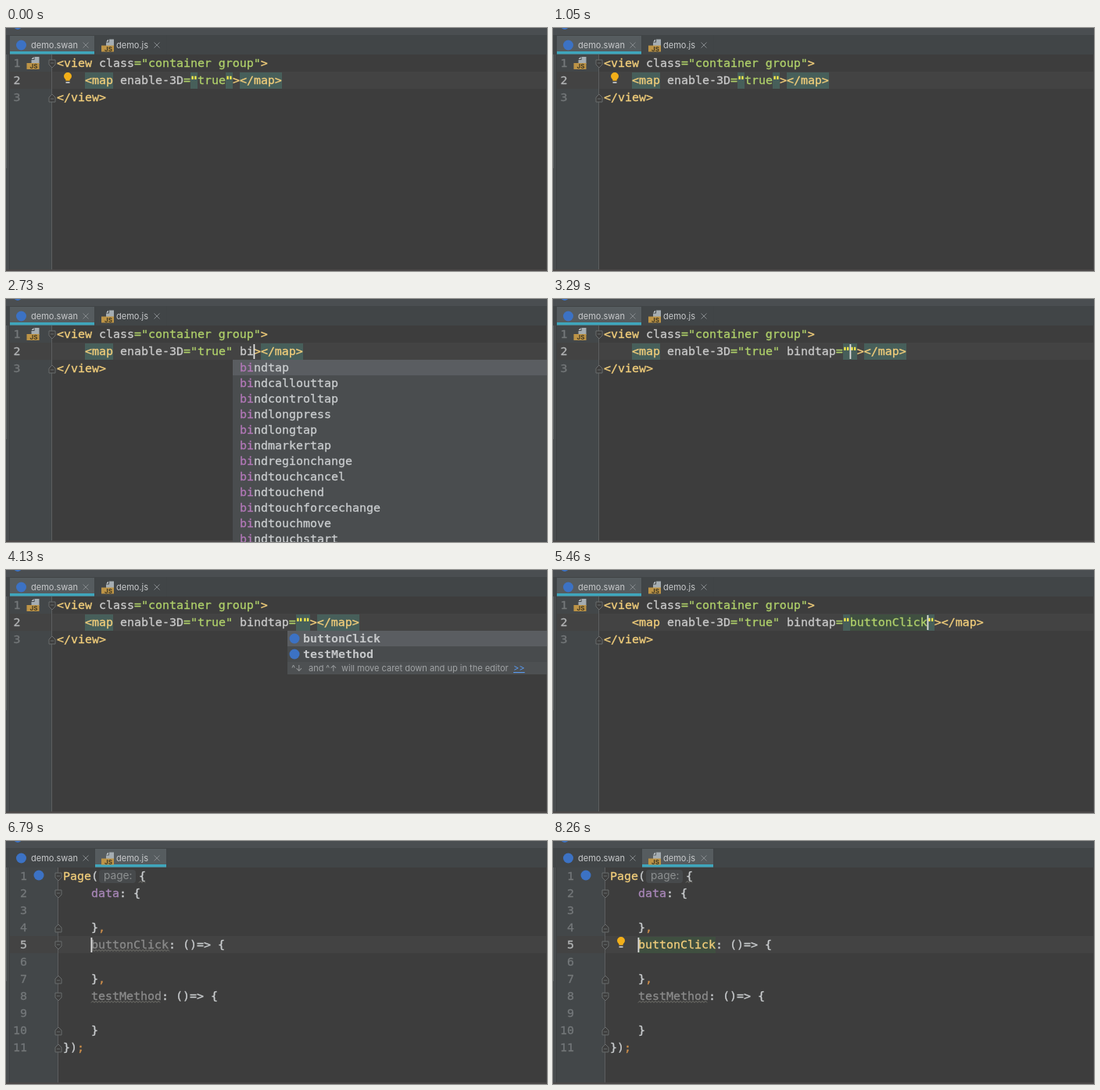
Recreate the animation shown at these times as an HTML page. Size 692 by 312 pixels, loop 8330 ms.

```html
<!DOCTYPE html>
<html lang="en">
<head>
<meta charset="utf-8">
<title>Editor completion</title>
<style>
  html, body { margin: 0; width: 100%; height: 100%; overflow: hidden; background: #3d3d3d; }
  svg { display: block; width: 692px; height: 312px; }
  text { white-space: pre; }
  .code, .ui, tspan { fill: currentColor; }
  .code, .code tspan { stroke: currentColor; stroke-width: .3px; }
  .code { font: 14.95px "DejaVu Sans Mono", monospace; color: #cbced0; }
  .ui { font: 11px Inter, sans-serif; color: #c8cacc; }
  .tag, .fn { color: #f2ce7b; }
  .attr { color: #cacaca; }
  .str { color: #b0d16a; }
  .quote { color: #fff04a; font-weight: 700; }
  .key { color: #a987b9; }
  .dim { color: #8b8b8b; }
  .punct { color: #cf8f4a; }
  .num { color: #74787a; }
  .now { color: #b4b6b7; }
  .typed { color: #b278b8; }
  .bold { font-weight: 700; color: #c6c8ca; stroke: none; }
  .hint { color: #a0a3a5; }
  .link { color: #5b9bf0; text-decoration: underline; }
  .match { fill: #475f5a; }
  .usage { fill: #3f4f40; }
  .line { fill: none; stroke: #696c6d; }
</style>
</head>
<body>
<svg viewBox="0 0 692 312" id="stage"></svg>
<script>
const LOOP = 8330, CHAR = 9, ROW = 22;
const EVENTS = ["tap", "callouttap", "controltap", "longpress", "longtap", "markertap",
  "regionchange", "touchcancel", "touchend", "touchforcechange", "touchmove", "touchstart"];

// at: start of the state, blink: start of a caret cycle
const STATES = [
  { at: 0, blink: -580, add: "", quotes: 19, bulb: true },
  { at: 1610, add: " ", quotes: 19 },
  { at: 1890, add: " b" },
  { at: 1960, blink: 1890, add: " b", list: 1 },
  { at: 2380, add: " bi", list: 2 },
  { at: 2870, add: " bin", list: 3 },
  { at: 3010, add: " bind", list: 4 },
  { at: 3290, add: " bindtap=", value: "", quotes: 34 },
  { at: 3500, blink: 3290, add: " bindtap=", value: "", quotes: 34, methods: true },
  { at: 4410, add: " bindtap=", value: "buttonClick", quotes: 34 },
  { at: 4900, blink: 4410, add: " bindtap=", value: "buttonClick", quotes: 34, usage: true },
  { at: 6650, script: true },
  { at: 7560, blink: 7210, script: true, usage: true, bulb: true }
];

const esc = s => s.replace(/&/g, "&amp;").replace(/</g, "&lt;").replace(/>/g, "&gt;");
const rect = (x, y, w, h, fill) => `<rect x="${x}" y="${y}" width="${w}" height="${h}" fill="${fill}"/>`;
const mark = (x, row, n, cls) =>
  `<rect class="${cls}" x="${x}" y="${row * ROW + 13}" width="${n * CHAR}" height="21"/>`;
const text = (x, y, cls, s) => `<text x="${x}" y="${y}" class="${cls}">${esc(s)}</text>`;
const baseline = row => row * ROW + 28;
const code = (x, row, parts) => `<text x="${x}" y="${baseline(row)}" class="code">` +
  parts.map(([cls, s]) => `<tspan class="${cls}">${esc(s)}</tspan>`).join("") + "</text>";
const logo = (x, y, r = 6.5) => `<circle cx="${x}" cy="${y}" r="${r}" fill="#3c72c4"/>`;

function fold(x, row, up) {
  return `<g class="line" transform="translate(${x} ${row * ROW + 24}) scale(1 ${up ? -1 : 1})">
    <path fill="#3d3d3d" d="M-4-5h8v6l-4 4-4-4zM-2-1h4"/></g>`;
}

function jsIcon(x, y) {
  return `<g transform="translate(${x} ${y})">
    <path fill="#a5adb2" d="M10 0h6v9H6V4h4z"/><path fill="#c5cbd0" d="M6 3l3-3v3z"/>
    ${rect(0, 8, 16, 8, "#bd9446")}
    <text x="4" y="15" font-family="Inter, sans-serif" font-size="8" font-weight="700" fill="#3c3522">JS</text></g>`;
}

function bulb(x, y) {
  return `<g transform="translate(${x} ${y})"><path fill="#f2af19"
    d="M-5-2a5 5 0 1 1 10 0q0 2.5-2.4 4.4v1.4h-5.2v-1.4Q-5 .5-5-2z"/>
    ${rect(-2.5, 5, 5, 2, "#b5b7b8")}</g>`;
}

function wave(x, row, n) {
  let d = `M${x} ${row * ROW + 31.5}`;
  for (let i = 0; i < n * CHAR / 4 - .5; i++) d += "l2-2l2 2";
  return `<path d="${d}" fill="none" stroke="#85857d" stroke-width=".8"/>`;
}

function tabs(script) {
  const [x, w] = script ? [114, 91] : [5, 108];
  const cross = cx => `<path d="M${cx - 3.5} 18.5l7 7m0-7l-7 7" stroke="#85898c" fill="none"/>`;
  return rect(0, 0, 692, 9, "#4a4e51") + rect(0, 9, 692, 1, "#404446") +
    rect(0, 10, 692, 24, "#414547") + rect(x, 10, w, 24, "#565c5f") +
    rect(113, 10, 1, 24, "#3f4345") + rect(205, 10, 1, 24, "#3f4345") +
    rect(x, 30, w, 3.5, "#3fa6bc") +
    logo(15, -3, 5) + logo(19.5, 22) + text(32, 26, "ui", "demo.swan") + cross(102) +
    jsIcon(122, 14.5) + text(141, 26, "ui", "demo.js") + cross(193);
}

function frame(edge, rows, current) {
  let s = rect(0, 0, 692, 312, "#3d3d3d") + rect(0, 34, edge, 278, "#434749") +
    rect(5, current * ROW + 12, 687, ROW, "#434343") +
    rect(edge - 1, 34, 1, 278, "#5c5e5f") +
    rect(0, 34, 4, 278, "#484c4e") + rect(0, 34, 1, 146, "#606466") + rect(4, 34, 1, 278, "#3c3f41") +
    rect(691, 34, 1, 278, "#484848") + rect(0, 310, 692, 2, "#4b4848");
  for (let i = 1; i <= rows; i++) {
    const x = rows > 9 ? 27 - CHAR * String(i).length : 9.5;
    s += text(x, baseline(i), "code " + (i === current ? "now" : "num"), String(i));
  }
  return s;
}

function eventList(n) {
  const word = "bind";
  return rect(290, 78, 402, 234, "#4a4d4f") + rect(290, 78, 402, 20, "#5a5d61") +
    EVENTS.map((e, i) => `<text class="code" x="299" y="${93 + i * 20}"><tspan class="typed">${
      word.slice(0, n)}</tspan>${word.slice(n)}${e}</text>`).join("");
}

function methodList() {
  const row = (y, s) => logo(369, y) + text(380, y + 5, "code bold", s);
  return rect(360, 78, 332, 56, "#484b4d") + rect(360, 78, 332, 20, "#5a5d61") +
    row(88, "buttonClick") + row(108, "testMethod") + rect(360, 118, 332, 16, "#4d5052") +
    text(365, 130, "ui hint", "^↓") + text(387, 130, "ui hint", "and") + text(409, 130, "ui hint", "^↑") +
    text(429, 130, "ui hint", "will move caret down and up in the editor") + text(649, 130, "ui link", ">>");
}

function markup(st) {
  const x = 65, col = n => x + n * CHAR, hasValue = st.value !== undefined;
  const end = 25 + st.add.length + (hasValue ? st.value.length + 2 : 0);
  const quoted = (s, lit) => [[lit ? "quote" : "str", '"'], ["str", s], [lit ? "quote" : "str", '"']];
  const inner = hasValue ? st.value : "true";
  const close = st.quotes + inner.length + 1;
  let s = frame(59, 3, 2);
  if (!st.usage) s += mark(col(4), 2, 4, "match") + mark(col(end + 1), 2, 6, "match");
  if (st.quotes) s += mark(col(st.quotes), 2, 1, "match") + mark(col(close), 2, 1, "match");
  if (st.usage) s += mark(col(35), 2, 11, "usage");
  s += code(x, 1, [["tag", "<view "], ["attr", "class"], ["str", '="container group"'], ["tag", ">"]]) +
    code(col(4), 2, [["tag", "<map "], ["attr", "enable-3D"], ["str", "="],
      ...quoted("true", st.quotes === 19), ["attr", st.add.replace("=", "")],
      ...(hasValue ? [["str", "="], ...quoted(st.value, true)] : []), ["tag", "></map>"]]) +
    code(x, 3, [["tag", "</view>"]]) +
    fold(59, 1) + fold(59, 3, true) + jsIcon(26.5, 37);
  if (st.bulb) s += bulb(79, 64);
  if (st.list) s += eventList(st.list);
  if (st.methods) s += methodList();
  return s + caret(col(end - (hasValue ? 1 : 0)), 2);
}

function script(st) {
  const x = 73, inX = x + 4 * CHAR;
  let s = frame(67, 11, 5);
  if (st.usage) s += mark(inX, 5, 11, "usage");
  s += code(x, 1, [["fn", "Page"], ["", "("]]) +
    `<rect x="119" y="37" width="47" height="17" rx="4" fill="#474a4c"/>` +
    `<text x="125" y="49" class="ui" style="font-size:13.7px;color:#8d9091">page:</text>` +
    code(170, 1, [["", "{"]]) + wave(170, 1, 1) +
    code(inX, 2, [["key", "data"], ["", ": {"]]) +
    code(inX, 5, [[st.usage ? "fn" : "dim", "buttonClick"], ["", ": ()=> {"]]) +
    code(inX, 8, [["dim", "testMethod"], ["", ": ()=> {"]]) + wave(inX, 8, 10) +
    [4, 7].map(r => code(inX, r, [["", "}"], ["punct", ","]])).join("") +
    code(inX, 10, [["", "}"]]) + code(x, 11, [["", "})"], ["punct", ";"]]);
  if (!st.usage) s += wave(inX, 5, 11);
  s += [1, 2, 5, 8].map(r => fold(67, r)).join("") +
    [4, 7, 10, 11].map(r => fold(67, r, true)).join("") + logo(42, 44);
  if (st.bulb) s += bulb(87, 130);
  return s + caret(inX, 5);
}

const caret = (x, row) =>
  `<rect id="caret" x="${x - .5}" y="${row * ROW + 14}" width="1.8" height="19" fill="#dedede"/>`;

const stage = document.getElementById("stage");
let shown;

function draw(now) {
  const t = now % LOOP;
  const st = STATES.findLast(s => s.at <= t);
  if (st !== shown) {
    stage.innerHTML = (st.script ? script(st) : markup(st)) + tabs(st.script);
    shown = st;
  }
  const phase = Math.floor((t - (st.blink ?? st.at)) / 500);
  document.getElementById("caret").style.opacity = phase % 2 ? 0 : 1;
}

const start = performance.now();
function tick() {
  draw(performance.now() - start);
  requestAnimationFrame(tick);
}
tick();
</script>
</body>
</html>
```
